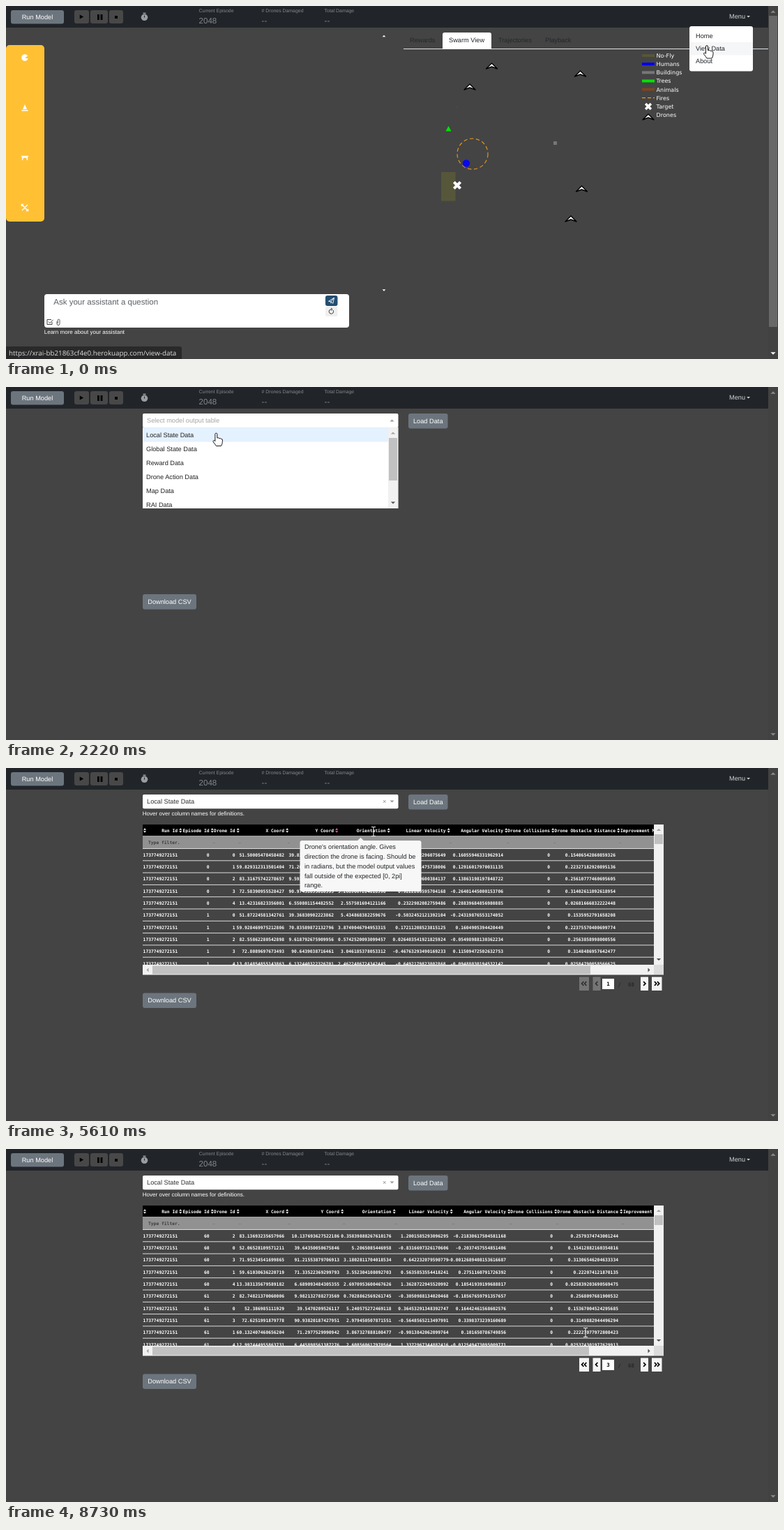
Animation, 1107 px wide and 506 px high, one loop 9300 ms. Source, as an HTML page:

```html
<!DOCTYPE html>
<html lang="en">
<head>
<meta charset="utf-8">
<title>Swarm data viewer</title>
<style>
html, body { margin: 0; width: 100%; height: 100%; overflow: hidden; background: #444; }
svg { display: block; width: 1107px; height: 506px; }
text { font: 9.22px "Liberation Sans", Arial, sans-serif; white-space: pre; text-rendering: geometricPrecision; }
.sm { font-size: 8.06px; }
.xs { font-size: 6.92px; }
.lg { font-size: 11.53px; }
.key { font: 8.06px "DejaVu Sans", sans-serif; }
.url { font: 9.8px "Open Sans", sans-serif; }
.mono { font: bold 6.32px "DejaVu Sans Mono", monospace; }
.num { font: bold 7.4px "DejaVu Sans Mono", monospace; }
.end { text-anchor: end; }
.mid { text-anchor: middle; }
</style>
</head>
<body>
<svg id="stage" viewBox="0 0 1107 506"></svg>
<script>
const LOOP = 9300;
const AT = { leave: 390, open: 1380, pick: 2310, spin: 2950, load: 3210, tip: 5310, untip: 6330, page2: 7770, page3: 7980 };

const box = (x, y, w, h, fill, r = 0, id = '') =>
  `<rect ${id && `id="${id}"`} x="${x}" y="${y}" width="${w}" height="${h}" rx="${r}" fill="${fill}"/>`;
const dot = (x, y, r, fill, more = '') => `<circle cx="${x}" cy="${y}" r="${r}" fill="${fill}" ${more}/>`;
const text = (x, y, s, fill, cls = '', id = '') =>
  `<text ${id && `id="${id}"`} x="${x}" y="${y}" fill="${fill}" class="${cls}">${s}</text>`;
const path = (d, fill, x = 0, y = 0, more = '') =>
  `<path d="${d}" fill="${fill}" transform="translate(${x} ${y})" ${more}/>`;
const line = (d, stroke, w = 1, x = 0, y = 0, more = '') =>
  path(d, 'none', x, y, `stroke="${stroke}" stroke-width="${w}" ${more}`);
const tri = (x, y, s, fill, turn = 0, h = s) =>
  `<path d="M${-s} ${h / 2}L0 ${-h / 2} ${s} ${h / 2}z" fill="${fill}" transform="translate(${x} ${y}) rotate(${turn})"/>`;
const group = (id, body) => `<g id="${id}">${body}</g>`;
const button = (x, y, w, h, label, id) =>
  box(x, y, w, h, '#6c757d', 3, id) + text(x + w / 2, y + h / 2 + 3.1, label, '#fff', 'mid');
const repeat = (n, draw) => Array.from({ length: n }, (_, i) => draw(i)).join('');

// Navigation bar
const GREY = '#85888b';
const stat = (i, label, value) =>
  text(276.6 + i * 90, 9.4, label, GREY, 'xs') + text(276.6 + i * 90, 24.6, value, GREY, 'lg');
const navbar = box(0, 0, 1093, 31, '#212529') + button(7, 6, 76, 19.5, 'Run Model') +
  box(98, 6, 21, 19, '#484848', 3) + box(121, 6, 25, 19, '#484848', 3) + box(148, 6, 20, 19, '#484848', 3) +
  tri(108.5, 15.5, 3, '#000', 90, 5.5) + box(131, 12, 2.8, 8, '#000') + box(135.6, 12, 2.8, 8, '#000') +
  box(156, 14, 4, 4, '#000') +
  dot(198.5, 16.3, 4.8, '#9a9da0') + box(196.5, 9.6, 4, 1.5, '#9a9da0') + line('M0 0V-3', '#212529', 1, 198.5, 16.6) +
  stat(0, 'Current Episode', '2048') + stat(1, '# Drones Damaged', '--') + stat(2, 'Total Damage', '--') +
  text(1037, 18.4, 'Menu', '#d0d1d2') + tri(1064.6, 15.3, 2.4, '#d0d1d2', 180) +
  box(1093, 0, 14, 506, '#424242') + tri(1100, 8, 3.6, '#8a8a8a');

// Start page
const badges = dot(27, 74, 4.8, '#fff') + path('M0 0L4-3.5A5 5 0 0 1 5 1z', '#ffc133', 27.5, 74.5) +
  path('M0-5L3 2H-3zM-4.5 3H4.5V4.6H-4.5z', '#fff', 27, 146) +
  line('M-5-2.5H5M-3.4-2V3M3.4-2V3M-3 0Q0-2.5 3 0', '#fff', 1.4, 27, 218) +
  line('M-4-4L4 4M4-4L-4 4M-4.6-2V-4.6H-2M4.6 2V4.6H2', '#fff', 1.5, 27, 289);
const target = (x, y, r) => line(`M${-r} ${-r}L${r} ${r}M${r} ${-r}L${-r} ${r}`, '#fff', r * .9, x, y);
const drone = (x, y) =>
  path('M-8 4L0-4 8 4 0 1z', '#fff', x, y, 'stroke="#000" stroke-width="1.4" stroke-linejoin="round"');
const legend = ['No-Fly', 'Humans', 'Buildings', 'Trees', 'Animals', 'Fires', 'Target', 'Drones'];
const swatch = ['#56563a', '#0000ee', '#777', '#00e400', '#7a4522'];
const chat = box(55, 413, 437, 48, '#fff', 4) + text(68.3, 428, 'Ask your assistant a question', '#5b6066', 'lg') +
  box(458, 415, 17.5, 15, '#234e72', 3) + line('M-4 1L4-4 2.4 4-.6 1.5zM4-4L-.6 1.5V4', '#fff', .9, 466.5, 422.3) +
  box(458, 431, 17.5, 14, '#efefef', 2) +
  line('M2.4-2A3.2 3.2 0 1 1 0-3.2M-.4-5L1.6-3.3-.4-1.6', '#333', 1, 466.5, 438) +
  line('M3 0V3.5H-4V-3.5H2M-2-.5L0 1.6 4.5-3.2', '#333', .9, 63, 453) +
  line('M-2-1V2.5A2 2 0 0 0 2 2.5V-2.5A1.4 1.4 0 0 0-.8-2.5V2', '#444', .9, 75, 453) +
  text(54.7, 469.6, 'Learn more about your assistant', '#fff', 'sm');
const home = box(0, 56, 55, 253, '#ffc133', 5) + badges + chat +
  tri(542, 43, 2.4, '#fff') + tri(542, 407.5, 2.4, '#fff', 180) +
  text(579, 52.4, 'Rewards', '#24272a') + text(706, 52.4, 'Trajectories', '#24272a') + text(773, 52.4, 'Playback', '#24272a') +
  box(570, 61, 523, 1, '#dee2e6') + path('M0 24V3Q0 0 3 0H67Q70 0 70 3V24z', '#fff', 626, 38) +
  text(635, 52.4, 'Swarm View', '#212529') +
  legend.map((s, i) => text(932.6, 74 + i * 12.15, s, '#fff', 'key')).join('') +
  swatch.map((c, i) => box(912, 69 + i * 12.15, 18, 4, c)).join('') +
  line('M0 0H18', '#e59a22', 1.2, 912, 131.7, 'stroke-dasharray="5 3"') +
  target(921, 144, 3.9) + drone(921, 159) +
  box(624, 238, 20.5, 41.5, '#56563a') + box(785, 194, 5, 5, '#777') + box(646, 144.5, 1, 1, '#655048') +
  dot(669, 212, 22, 'none', 'stroke="#dd951f" stroke-width="1.2" stroke-dasharray="5.4 3.6"') +
  dot(660, 225.5, 5.2, '#0808f0') + tri(634.5, 175.7, 4, '#00e400', 0, 7.5) + target(647, 257, 4.6) +
  drone(696.5, 86) + drone(823.5, 97) + drone(665, 116) + drone(825.5, 262) + drone(810, 305) +
  box(980, 29, 91, 64.5, '#fff', 3) + box(980, 52, 91, 18.4, '#f5f6f7') +
  ['Home', 'View Data', 'About'].map((s, i) => text(989, 45.5 + i * 18.4, s, '#212529')).join('') +
  box(1094, 14, 12, 446, '#686868') + tri(1100, 498, 3.6, '#fff', 180) +
  path('M0 0H249Q252 0 252 3V18H0z', '#292929', 0, 488) +
  text(4, 500.6, 'https://xrai-bb21863cf4e0.herokuapp.com/view-data', '#dcdcdc', 'url');

// Data page
const ITEM = 20.1;
const options = ['Local State Data', 'Global State Data', 'Reward Data', 'Drone Action Data', 'Map Data', 'RAI Data'];
const form = tri(1100, 498, 3.6, '#8a8a8a', 180) + box(196, 38, 366.5, 20.3, '#fff', 2) +
  group('empty', text(202, 51, 'Select model output table', '#a5a5a5')) +
  group('chosen', text(202, 51, options[0], '#333') + text(540, 50.6, '×', '#888') +
    text(195.8, 67.8, 'Hover over column names for definitions.', '#fff', 'sm')) +
  group('closed', tri(553.5, 48, 3, '#999', 180)) +
  button(577, 38, 56.5, 21.5, 'Load Data', 'load') + group('download', button(196, 297, 77, 21.7, 'Download CSV'));
const list = tri(553.5, 48, 3, '#999') + box(196, 58, 366.5, 116, '#fff') + box(196, 58, 366.5, .7, '#ddd') +
  box(196.5, 58.5, 351.5, ITEM, '#e4f1ff', 0, 'mark') +
  options.map((s, i) => text(201, 71.6 + i * ITEM, s, '#222')).join('') +
  box(548, 58.5, 14, 115.5, '#f1f1f1') + box(549, 73, 12, 61, '#c1c1c1') +
  tri(555, 66, 3.2, '#a3a3a3') + tri(555, 166, 3.2, '#505050', 180);

// Table: each drone stays near its own x, y, orientation and obstacle distance
const ROW = 17.3;
const drones = [[52, 39.5, 5.3, .154], [60, 71, 3.7, .223], [83, 9.8, .55, .257], [72.4, 91, 3.1, .314], [13, 6.4, 2.5, .026]];
let seed = 7;
const near = (v, spread) => {
  seed = seed * 16807 % 2147483647;
  return v + (seed / 2147483647 - .5) * spread;
};
const record = (page, k) => {
  const id = (k * page + page - 1) % 5;
  const [x, y, turn, gap] = drones[id];
  return ['1737749272151', (page - 1) * 30 + (k > 4), id, near(x, 1), near(y, .8), near(turn, .4),
    near(0, 3), near(0, .7), 0, near(gap, .002)];
};
const heads = ['Run Id', 'Episode Id', 'Drone Id', 'X Coord', 'Y Coord', 'Orientation', 'Linear Velocity',
  'Angular Velocity', 'Drone Collisions', 'Drone Obstacle Distance'];
const rights = [246, 291.5, 328.5, 399, 470, 544.5, 630.5, 713, 780, 874];
const stops = [199, ...rights.map(x => x + 4.2)];
const sorter = x => path('M-2-.7L0-3.2 2-.7zM-2 .7L0 3.2 2 .7z', '#fff', x, 89.5, 'class="sort"');
const sheet = page => {
  const shift = i => page == 1 || i < 4 ? 0 : i < 6 ? 8 : 4;
  const cell = (v, i, y) => text(rights[i] + shift(i), y, v, '#fff', 'mono end');
  return group('page' + page,
    stops.map((x, i) => sorter(x + shift(i - 1)) + (i > 1 ? box(x + shift(i - 1) + 1, 107, 3, 1, '#7c7c7c') : '')).join('') +
    heads.map((s, i) => cell(s, i, 91.9)).join('') +
    text(881 + shift(9), 91.9, 'Improvement Metric', '#fff', 'mono') +
    repeat(10, k => record(page, k).map((v, i) => cell(v, i, 126.8 + k * ROW)).join('')));
};
const chevron = (x, dir) => line(`M${-dir * 1.4}-2.8L${dir * 1.4} 0 ${-dir * 1.4} 2.8`, '#000', 1.7, x, 309);
const pager = group('back', box(822, 299.5, 14, 19.5, '#f4f4f4') + chevron(827, -1) + chevron(831, -1) +
    box(841.5, 299.5, 11, 19.5, '#f4f4f4') + chevron(847, -1)) +
  box(910, 299.5, 11, 19.5, '#f4f4f4') + chevron(915.5, 1) +
  box(926, 299.5, 14.5, 19.5, '#f4f4f4') + chevron(931.3, 1) + chevron(935.3, 1) +
  box(855, 302, 17, 15, '#fff') + text(863.4, 312.2, 1, '#000', 'num mid', 'number') +
  text(877.5, 312.5, '/', '#282828', 'num') + text(892, 312.5, '68', '#282828', 'num');
const grid = box(196, 81, 733, 16.5, '#000') + box(196, 98, 733, 17, '#919191') + box(196, 97.3, 733, .8, '#ccc') +
  repeat(10, k => box(196, 115 + k * ROW, 733, 1, '#dcdcdc')) +
  `<g clip-path="url(#pane)">${text(204, 109, 'Type filter.', '#3c3c3c', 'mono')}${sheet(1)}${sheet(2)}${sheet(3)}</g>` +
  box(196, 282, 733, 14.5, '#f1f1f1') + box(210, 283.5, 628, 12, '#c1c1c1', 0, 'thumb') +
  tri(203, 289.5, 3, '#a3a3a3', -90) + tri(922, 289.5, 3, '#505050', 90) +
  box(929, 81, 14, 201, '#f1f1f1') + box(930, 95, 12, 14, '#c1c1c1') + box(929, 282, 14, 14.5, '#dcdcdc') +
  tri(936, 88.5, 3.2, '#a3a3a3') + tri(936, 274.5, 3.2, '#505050', 180) + pager;

const bars = repeat(5, i => box(562 + i * 5.8, 192, 3.6, 20.5, '#119dff', 0, 'bar' + i));
const note = ["Drone's orientation angle. Gives", 'direction the drone is facing. Should be',
  'in radians, but the model output values', 'fall outside of the expected [0, 2pi]', 'range.'];
const tip = tri(508.5, 102, 4.6, '#f7f7f7') + box(421.5, 104, 174, 73, '#f7f7f7', 3) +
  note.map((s, i) => text(428, 116 + i * 13.85, s, '#212529')).join('');

const ink = 'stroke="#000" stroke-width=".9" stroke-linejoin="round"';
const cursors = {
  hand: path('M-1.5 1Q-1.5-.3 0-.3T1.5 1V6.5Q3.5 5.8 4.5 7.2 6.3 6.6 7.2 8 9 7.6 9 9.5V12Q9 15 7.2 18H0Q-1.5 15.5-4 12.5-5 10.5-3.5 10-2.3 10-1.5 11.2z', '#fff', 0, 0, ink),
  arrow: path('M0 0V14.6L3.2 11.6 5.5 16.6 7.7 15.6 5.5 10.8H10z', '#fff', 0, 0, ink),
  beam: line('M-3-6.5H-1Q0-6.5 0-5.5 0-6.5 1-6.5H3M0-5.5V5.5M-3 6.5H-1Q0 6.5 0 5.5 0 6.5 1 6.5H3', '#e6e6e6', 1.1),
};

const stage = document.getElementById('stage');
stage.innerHTML = '<clipPath id="pane"><rect x="196" y="81" width="733" height="201"/></clipPath>' +
  box(0, 0, 1107, 506, '#444') + navbar + group('home', home) +
  group('view', form + group('spin', bars) + group('grid', grid) + group('list', list) + group('tip', tip)) +
  group('cursor', Object.entries(cursors).map(([k, s]) => group(k, s)).join(''));

// Motion
const el = id => document.getElementById(id);
const show = (id, on) => el(id).setAttribute('display', on ? 'inline' : 'none');
const clamp = v => Math.min(1, Math.max(0, v));
const smooth = v => v * v * (3 - 2 * v);
const sorters = document.querySelectorAll('#page1 .sort');

// Pointer moves: start, end, x, y
const moves = [
  [0, 150, 1005, 58], [390, 1320, 425, 48], [1380, 1680, 413, 107], [1800, 2250, 300, 66], [2310, 2760, 597, 50],
  [3390, 3840, 188, 142], [3840, 4140, 378, 151], [4350, 4680, 228, 122], [4680, 5280, 527, 91],
  [6330, 6690, 754, 91], [6990, 7440, 897, 295], [7440, 7620, 916, 314], [8550, 8730, 831, 263],
];
const pointer = t => moves.reduce(([x, y], [from, to, x1, y1]) => {
  const k = smooth(clamp((t - from) / (to - from)));
  return [x + (x1 - x) * k, y + (y1 - y) * k];
}, [1005, 57]);

function render(t) {
  const [x, y] = pointer(t);
  const inside = (l, top, r, b) => x >= l && x < r && y >= top && y < b;
  const picked = t >= AT.pick, open = t >= AT.open && !picked, loaded = t >= AT.load;
  const page = t < AT.page2 ? 1 : t < AT.page3 ? 2 : 3;
  const onLoad = inside(577, 38, 633, 60), onHead = loaded && inside(196, 81, 929, 98);
  const onText = loaded && inside(196, 115, 929, 282) && Math.abs((y - 115) % ROW - ROW / 2) < 4;

  const kind = t < AT.leave || open || onLoad || loaded && inside(910, 299, 921, 319) ? 'hand'
    : onHead || onText ? 'beam' : 'arrow';
  for (const k in cursors) show(k, k == kind);
  el('cursor').setAttribute('transform', `translate(${x} ${y})`);

  show('home', t < AT.leave);
  show('view', t >= AT.leave);
  show('empty', !picked);
  show('chosen', picked);
  show('closed', !open);
  show('list', open);
  el('mark').setAttribute('y', 58.5 + ITEM * Math.max(0, Math.floor((y - 58.5) / ITEM)));
  el('download').setAttribute('transform', `translate(0 ${picked ? 25.4 : 0})`);
  el('load').setAttribute('fill', onLoad ? '#5c636a' : '#6c757d');

  show('spin', t >= AT.spin && !loaded);
  for (let i = 0; i < 5; i++) {
    const beat = (t - AT.spin - i * 100) / 240;
    const h = 20.5 * (.4 + .6 * smooth(clamp(1 - Math.abs(beat - 1))));
    el('bar' + i).setAttribute('height', h);
    el('bar' + i).setAttribute('y', 202 - h / 2);
  }

  show('grid', loaded);
  for (let n = 1; n < 4; n++) show('page' + n, n == page);
  el('number').textContent = page;
  el('thumb').setAttribute('width', page > 1 ? 626 : 628);
  el('back').setAttribute('opacity', page > 1 ? 1 : .28);
  sorters.forEach((s, i) => s.setAttribute('fill', onHead && x >= stops[i] && x < stops[i + 1] ? 'hotpink' : '#fff'));
  el('tip').setAttribute('opacity', clamp((t - AT.tip) / 150) * clamp(1 - (t - AT.untip) / 150));
}

const start = performance.now();
(function frame() {
  render((performance.now() - start) % LOOP);
  requestAnimationFrame(frame);
})();
</script>
</body>
</html>
```
